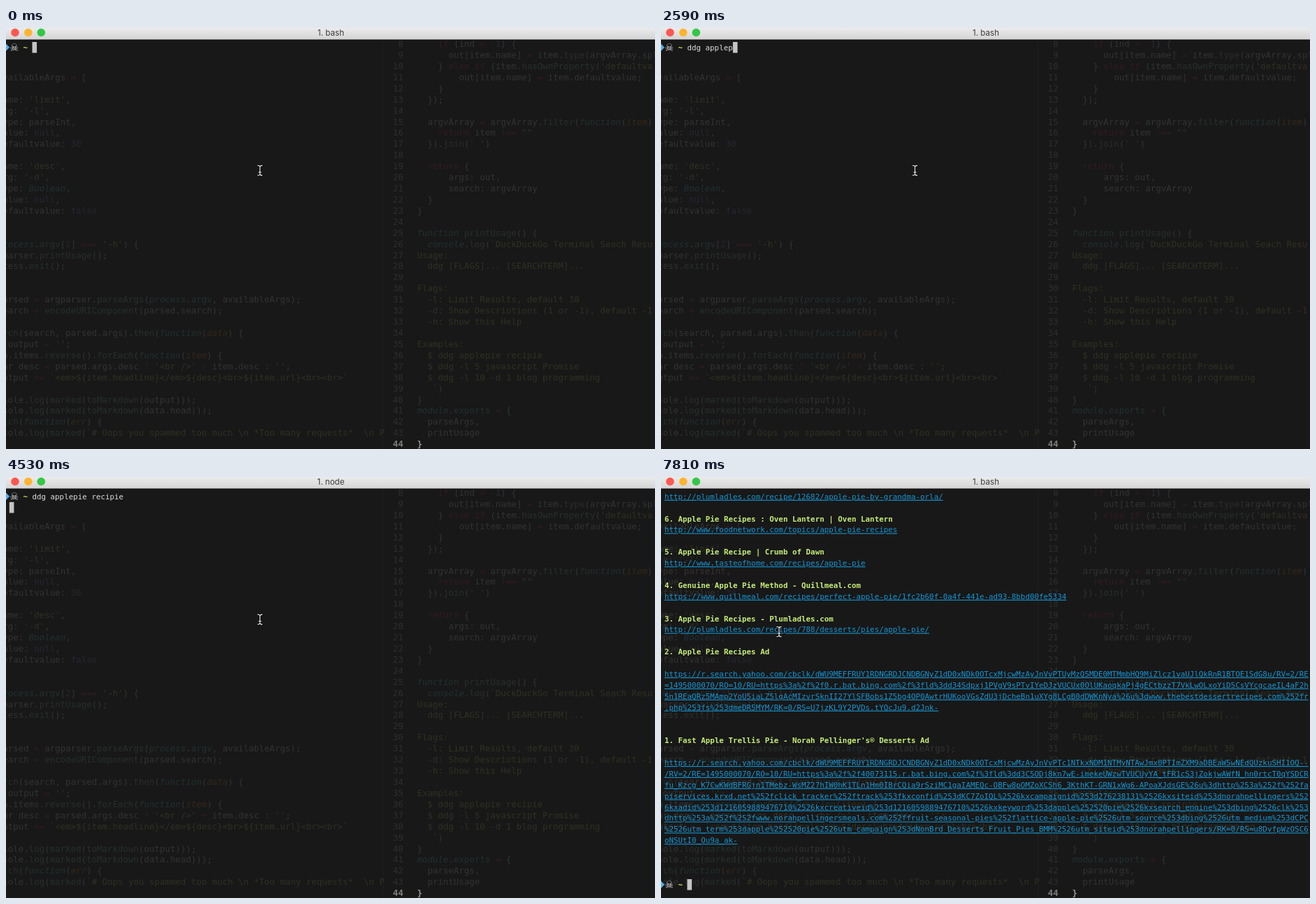
These frames come from a looping animation (929x603 px, 8000 ms). An HTML page:

```html
<!DOCTYPE html>
<html lang="en">
<head>
<meta charset="utf-8">
<title>Terminal search</title>
<style>
html, body { margin: 0; width: 100%; height: 100%; overflow: hidden; background: #181818; }
svg { display: block; width: 929px; height: 603px; }
text { white-space: pre; font-family: "DejaVu Sans Mono", monospace; }
.code { font-size: 12.44px; opacity: .115; }
.term { font-size: 10.86px; }
.head { fill: #c5ee78; font-weight: bold; }
.link { fill: #1596d4; text-decoration: underline; }
.title { font: 11.6px Inter, sans-serif; fill: #3c3c3c; text-anchor: middle; }
</style>
</head>
<body>
<svg id="stage" viewBox="0 0 929 603">
  <defs>
    <linearGradient id="bar" x2="0" y2="1">
      <stop offset="0" stop-color="#ebebeb"/><stop offset="1" stop-color="#d3d3d3"/>
    </linearGradient>
  </defs>
  <rect width="929" height="603" fill="#181818"/>
  <path d="M539.5 17V603" stroke="#1d1d1d"/>
  <g id="back"></g>
  <g id="results"></g>
  <g id="prompt">
    <path d="M0 22.5L5 27.8L0 33Z" fill="#55aeea"/>
    <text x="5.2" y="32.6" font-size="14.5" fill="#e4e4e4" style="font-family:'DejaVu Sans',sans-serif">&#x2620;&#xFE0E;</text>
    <text class="term" x="24.4" y="31.8" fill="#dfe45c" font-weight="bold">~</text>
    <text id="typed" class="term" x="37.4" y="31.8" fill="#dcdcdc"></text>
  </g>
  <rect id="caret" width="6.6" height="15.6" fill="#c4c4c4"/>
  <rect width="929" height="17" fill="url(#bar)"/>
  <path d="M0 17H929" stroke="#0d0d0d"/>
  <circle cx="13" cy="6.5" r="5.8" fill="#fc5753"/>
  <circle cx="31.8" cy="6.5" r="5.8" fill="#fdb52f"/>
  <circle cx="50.3" cy="6.5" r="5.8" fill="#33c748"/>
  <text id="title" class="title" x="465" y="11"></text>
  <g id="mouse" fill="none">
    <path id="beam" d="M-3.5-7.2Q0-7.2 0-5Q0-7.2 3.5-7.2M0-5V5M-3.5 7.2Q0 7.2 0 5Q0 7.2 3.5 7.2M-2 2.5H2" stroke="#000" stroke-width="2.6"/>
    <use href="#beam"/>
    <path d="M-3.5-7.2Q0-7.2 0-5Q0-7.2 3.5-7.2M0-5V5M-3.5 7.2Q0 7.2 0 5Q0 7.2 3.5 7.2M-2 2.5H2" stroke="#f2f2f2" stroke-width="1.2"/>
  </g>
</svg>
<script>
const $ = id => document.getElementById(id);
const LOOP = 8000, COL = 6.54, ROW = 15.886, LEFT = 4.9;

function add(parent, tag, attrs, text) {
  const el = document.createElementNS('http://www.w3.org/2000/svg', tag);
  for (const k in attrs) el.setAttribute(k, attrs[k]);
  if (text) el.textContent = text;
  parent.appendChild(el);
  return el;
}

// Dimmed editor behind the terminal
const leftCode = {
  11: 'vailableArgs = [',
  13: "ame: 'limit',\nrg: '-l',\nype: parseInt,\nalue: null,\nefaultvalue: 30",
  19: "ame: 'desc',\nrg: '-d',\nype: Boolean,\nalue: null,\nefaultvalue: false",
  26: "rocess.argv[2] === '-h') {\nparser.printUsage();\ncess.exit();",
  31: 'arsed = argparser.parseArgs(process.argv, availableArgs);\nearch = encodeURIComponent(parsed.search);',
  34: "rch(search, parsed.args).then(function(data) {\n output = '';\na.items.reverse().forEach(function(item) {\n" +
      "ar desc = parsed.args.desc ? '<br />' + item.desc : '';\n" +
      'utput += `<em>${item.headline}</em>${desc}<br>${item.url}<br><br>`',
  40: 'sole.log(marked(toMarkdown(output)));\nsole.log(marked(toMarkdown(data.head)));\ntch(function(err) {\n' +
      'sole.log(marked(`# Oops you spammed too much \\n *Too many requests*  \\n P'
};
const rightCode = `    if (ind > -1) {
      out[item.name] = item.type(argvArray.spl
    } else if (item.hasOwnProperty('defaultva
        out[item.name] = item.defaultvalue;
    }
  });

  argvArray = argvArray.filter(function(item)
    return item !== ""
  }).join(' ')

  return {
      args: out,
      search: argvArray
  }
}

function printUsage() {
  console.log(\`DuckDuckGo Terminal Seach Resu
Usage:
  ddg [FLAGS]... [SEARCHTERM]...

Flags:
  -l: Limit Results, default 30
  -d: Show Descriotions (1 or -1), default -1
  -h: Show this Help

Examples:
  $ ddg applepie recipie
  $ ddg -l 5 javascript Promise
  $ ddg -l 10 -d 1 blog programming
   \`)
}
module.exports = {
  parseArgs,
  printUsage
}`;

const rules = [
  [/^(['"`]).*?(\1|$)/, '#e6db74'],
  [/^(function|Boolean|console|module|r?ocess|process)\b/, '#66d9ef', 1],
  [/^(return|else|if)\b/, '#f92672'],
  [/^(null|false|\d+)\b/, '#ae81ff'],
  [/^(item|data|err)(?=\) ?\{?$)/, '#fd971f', 1],
  [/^\w+(?=\()/, '#8fd9c8'],
  [/^(argv|log|exports)\b/, '#66d9ef'],
  [/^\w+/, '#f8f8f2'],
  [/^[=!+<>?-]+/, '#f92672'],
  [/^./, '#f8f8f2']
];

const rowY = n => 600.2 - 15.92 * (44 - n);

function codeLine(x, n, line, plain) {
  const el = add($('back'), 'text', { class: 'code', x, y: rowY(n) });
  if (plain) return add(el, 'tspan', { fill: plain }, line);
  while (line) {
    const [re, fill, slant] = rules.find(r => r[0].test(line));
    const word = line.match(re)[0];
    add(el, 'tspan', slant ? { fill, 'font-style': 'italic' } : { fill }, word);
    line = line.slice(word.length);
  }
}

for (const start in leftCode)
  leftCode[start].split('\n').forEach((s, i) => codeLine(-4.7, +start + i, s));

rightCode.split('\n').forEach((s, i) => {
  const n = i + 8;
  codeLine(n < 10 ? 561.3 : 553.8, n, String(n), '#d0d0c8');
  codeLine(588.4, n, s, n > 26 && n < 40 ? '#e6db74' : '');
});
for (const el of [...$('back').children].slice(-2)) {
  el.style.opacity = .55;
  el.style.fontWeight = 'bold';
}

// Search results, one string per terminal row
const ad = 'https://r.search.yahoo.com/cbclk/dWU9MEFFRUY1RDNGRDJCNDBGNyZ1dD0xNDk0OTcxMjcwMzAyJnVv';
const results = `http://plumladles.com/recipe/12682/apple-pie-by-grandma-orla/

6. Apple Pie Recipes : Oven Lantern | Oven Lantern
http://www.foodnetwork.com/topics/apple-pie-recipes

5. Apple Pie Recipe | Crumb of Dawn
http://www.tasteofhome.com/recipes/apple-pie

4. Genuine Apple Pie Method - Quillmeal.com
https://www.quillmeal.com/recipes/perfect-apple-pie/1fc2b60f-0a4f-441e-ad93-8bbd00fe5334

3. Apple Pie Recipes - Plumladles.com
http://plumladles.com/recipes/788/desserts/pies/apple-pie/

2. Apple Pie Recipes Ad

${ad}PTUyMzQ5MDE0MTMmbHQ9MiZlcz1vaUJlQkRnR1BTOE1SdG8u/RV=2/RE
=1495000070/RO=10/RU=https%3a%2f%2f0.r.bat.bing.com%2f%3fld%3dd34Sdpxj1PVgV9sPTvIYeDJzVUCUx0OlUKaoqkaPj4gECtbzzT7VkLwOLxoYiD5CsVYcgcaeIL4aF2h
5n1REaQRz5MAmp2YoU5iaLZ5lgAcMIzvrSknII27YlSFBobs1Z5bg4OP0AwtrHUKooVGsZdU3jDcheBn1uXYg8LCgB0dDWKnNya%26u%3dwww.thebestdessertrecipes.com%252fr
.php%253fs%253dmeDR5MYM/RK=0/RS=U7jzKL9Y2PVDs.tYQcJu9.d2Jnk-


1. Fast Apple Trellis Pie - Norah Pellinger's® Desserts Ad

${ad}PTc1NTkxNDM1NTMyNTAwJmx0PTImZXM9aDBEaW5wNEdQUzkuSHI1OQ--
/RV=2/RE=1495000070/RO=10/RU=https%3a%2f%2f40073115.r.bat.bing.com%2f%3fld%3dd3C5ODj8kn7wE-imekeUWzwTVUCUyYA_tFR1cS3jZokjwAWfN_hn0rtcT0qYSDCR
fu_Kzcg_K7CwKWdBFRGjn1TMebz-WsMZ27hIW0hK1TLn1Hm0IBrCQia9rSziMC1gaIAMEQc-OBFw8pOMZoXCSh6_3KthKT-GRN1xWg6-APoaXJdsGE%26u%3dhttp%253a%252f%252fa
piservices.krxd.net%252fclick_tracker%252ftrack%253fkxconfid%253dKC7ZoIQL%2526kxcampaignid%253d276238131%2526kxsiteid%253dnorahpellingers%252
6kxadid%253d1216059889476710%2526kxcreativeid%253d1216059889476710%2526kxkeyword%253dapple%252520pie%2526kxsearch_engine%253dbing%2526clk%253
dhttp%253a%252f%252fwww.norahpellingersmeals.com%252ffruit-seasonal-pies%252flattice-apple-pie%2526utm_source%253dbing%2526utm_medium%253dCPC
%2526utm_term%253dapple%252520pie%2526utm_campaign%253dNonBrd_Desserts_Fruit_Pies_BMM%2526utm_siteid%253dnorahpellingers/RK=0/RS=u8DvfpWzOSC6
oNSUtI0_Ou9a_ak-`;

results.split('\n').forEach((s, i) => {
  const kind = /^\d\. /.test(s) ? 'head' : 'link';
  if (s) add($('results'), 'text', { class: 'term ' + kind, x: LEFT, y: 31.8 + ROW * i }, s);
});

// Typing: time and number of characters shown
const query = 'ddg applepie recipie';
const keys = [[0, 0], [500, 1], [650, 2], [950, 4], [1250, 6], [1400, 7], [1700, 8], [2000, 7], [2300, 9],
  [2590, 10], [2740, 11], [2890, 12], [3040, 13], [3340, 15], [3490, 16], [3640, 17], [3790, 18],
  [3930, 19], [4080, 20]];
const ENTER = 4230, RUN = 4530, DONE = 6330, EXIT = 7080;
const moves = [7230, 7380, 7530, 7660, 7810];

const bezier = (a, b, c, d, u) => {
  const v = 1 - u;
  return v * v * v * a + 3 * v * v * u * b + 3 * v * u * u * c + u * u * u * d;
};

function draw(t) {
  const done = t >= DONE, entered = t >= ENTER && !done;
  const count = done ? 0 : keys.filter(k => k[0] <= t).pop()[1];
  const row = done ? 35 : entered ? 1 : 0;
  const col = entered ? 0 : 5 + count;

  $('results').style.display = done ? '' : 'none';
  $('prompt').setAttribute('transform', `translate(0 ${done ? 35 * ROW : 0})`);
  $('typed').textContent = query.slice(0, count);
  $('caret').setAttribute('x', LEFT - .1 + COL * col);
  $('caret').setAttribute('y', 20 + ROW * row);
  $('title').textContent = t >= RUN && t < EXIT ? '1. node' : '1. bash';

  const u = moves.filter(m => m <= t).length / moves.length;
  const x = bezier(363.5, 330, 190, 169, u), y = bezier(204, 422, 422, 221.5, u);
  $('mouse').setAttribute('transform', `translate(${x} ${y})`);
}

const begin = performance.now();
function tick() {
  draw((performance.now() - begin) % LOOP);
  requestAnimationFrame(tick);
}
draw(0);
requestAnimationFrame(tick);
</script>
</body>
</html>
```
